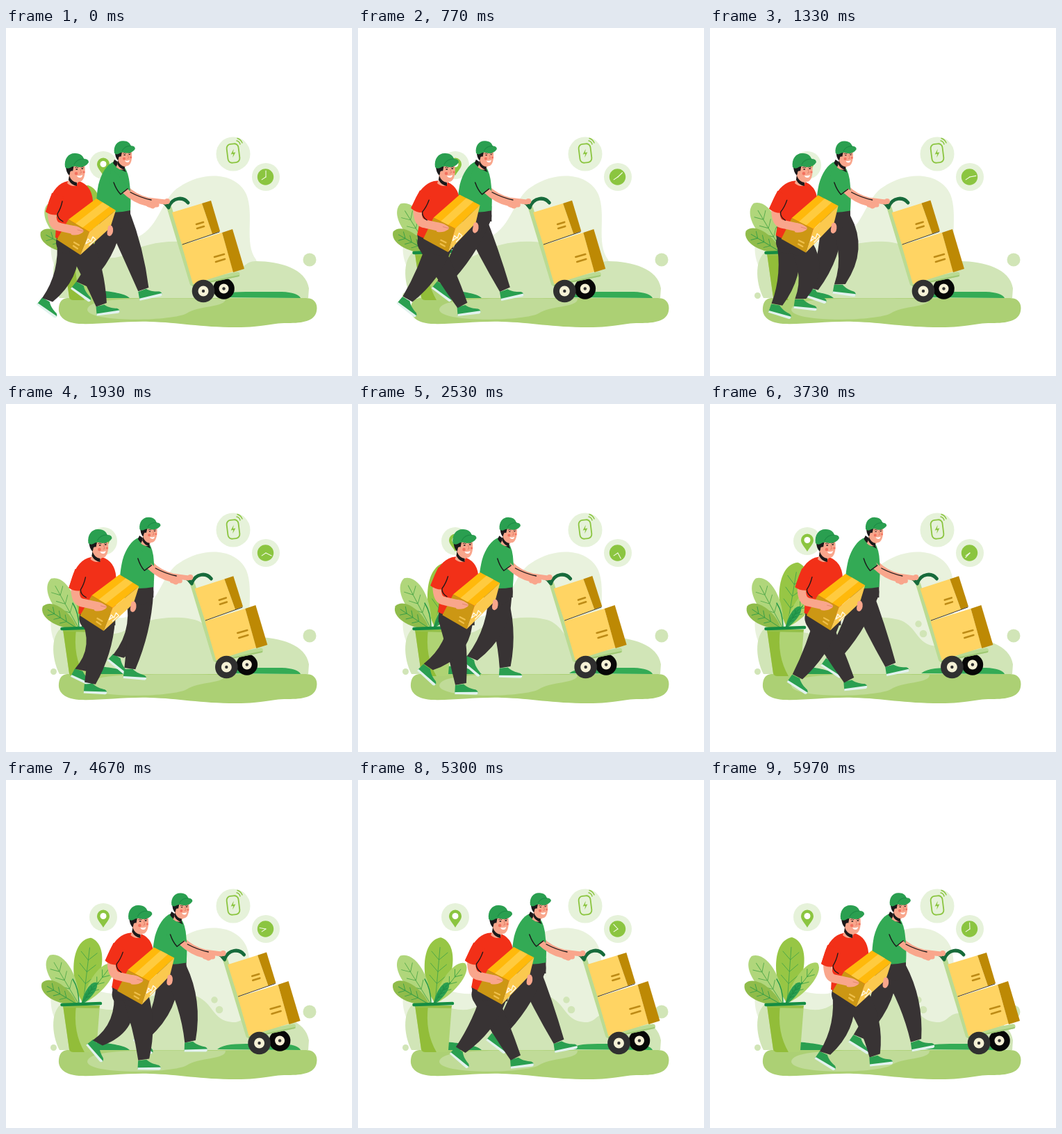
These frames come from a looping animation (498 px wide and 500 px high, 6010 ms). An HTML page with a canvas:

```html
<!DOCTYPE html>
<html lang="en">
<head>
<meta charset="utf-8">
<title>Delivery walk</title>
<style>
html, body { margin: 0; width: 100%; height: 100%; overflow: hidden; background: #fff; }
canvas { display: block; width: 498px; height: 500px; }
</style>
</head>
<body>
<canvas id="stage" width="498" height="500"></canvas>
<script>
const ctx = document.getElementById('stage').getContext('2d');
const LOOP = 6010, STEP = LOOP / 4, SPEED = 103 / 5970;
const TAU = Math.PI * 2, RAD = Math.PI / 180;
const C = {
  light: '#e9f2dd', hill: '#d1e5b7', ground: '#acd074', patch: '#c0db98',
  green: '#2a9f50', shirt: '#33aa55', deep: '#1d8a45', lime: '#8bc540', badge: '#e6f2da',
  skin: '#f9a68c', blush: '#f3715f', red: '#f23018', pants: '#383334', ink: '#1b191a'
};

function fill(d, color) { ctx.fillStyle = color; ctx.fill(new Path2D(d)); }
function line(d, color, w) {
  ctx.strokeStyle = color; ctx.lineWidth = w;
  ctx.lineCap = ctx.lineJoin = 'round';
  ctx.stroke(new Path2D(d));
}
function dot(x, y, r, color) {
  ctx.fillStyle = color;
  ctx.beginPath(); ctx.arc(x, y, r, 0, TAU); ctx.fill();
}
function at(x, y, deg, draw) {
  ctx.save(); ctx.translate(x, y); ctx.rotate(deg * RAD); draw(); ctx.restore();
}
// Rotate a drawing around a pivot in its own coordinates
function turn(px, py, deg, draw) {
  at(px, py, deg, () => { ctx.translate(-px, -py); draw(); });
}
const wave = (t, n) => (1 - Math.cos(TAU * n * t / LOOP)) / 2;

// Foot keys over one full stride: phase, x, y, tilt
const RED_STEP = [
  [0, 45, 405, -5], [.11, 24, 410, 3], [.285, -6, 410, 5], [.5, -40, 402, 38],
  [.61, -51, 389, 52], [.785, -24, 393, 28], [.9, 18, 399, 6]
];
const GREEN_STEP = [
  [0, 37, 382, -10], [.11, 22, 384, 2], [.285, -18, 389, 7], [.5, -60, 379, 38],
  [.61, -51, 379, 40], [.785, -41, 374, 42], [.9, 6, 378, 6]
];

// Periodic Hermite interpolation through the keys
function pose(keys, u) {
  u -= Math.floor(u);
  const n = keys.length;
  const key = i => {
    const k = keys[(i + n) % n], wrap = Math.floor(i / n);
    return [k[0] + wrap, k[1], k[2], k[3]];
  };
  let i = n - 1;
  while (keys[i][0] > u) i--;
  const a = key(i - 1), b = key(i), c = key(i + 1), d = key(i + 2);
  const h = c[0] - b[0], s = (u - b[0]) / h;
  return [1, 2, 3].map(j => {
    const m0 = (c[j] - a[j]) / (c[0] - a[0]) * h;
    const m1 = (d[j] - b[j]) / (d[0] - b[0]) * h;
    return (1 + 2 * s) * (1 - s) ** 2 * b[j] + s * (1 - s) ** 2 * m0
      + s * s * (3 - 2 * s) * c[j] + s * s * (s - 1) * m1;
  });
}

function leg(hx, hy, base, foot, bone, wide) {
  const [fx, fy, tilt] = foot, a = tilt * RAD;
  const x = base + fx;
  const ax = x - 8 * Math.cos(a) + 8 * Math.sin(a);
  const ay = fy - 8 * Math.sin(a) - 8 * Math.cos(a);
  at(x, fy, tilt, () => {
    fill('M-16 -6 L-4 -8 C2 -3 8 -2 14 -1 Q18 1 17 4 L-16 6 Z', C.green);
    fill('M-16 4 L17 2 Q18 5 15 6 L-16 7 Z', '#e2f2ee');
  });
  const dx = ax - hx, dy = ay - hy, dist = Math.hypot(dx, dy);
  const bend = Math.sqrt(Math.max(0, bone * bone - dist * dist / 4));
  const nx = dy / dist, ny = -dx / dist;
  const kx = hx + dx / 2 + nx * bend, ky = hy + dy / 2 + ny * bend;
  const w = [wide, wide * .9, 8];
  const p = [[hx, hy], [kx, ky], [ax, ay]];
  const side = (i, s) => [p[i][0] + nx * w[i] * s, p[i][1] + ny * w[i] * s];
  ctx.fillStyle = C.pants;
  ctx.beginPath();
  ctx.moveTo(...side(0, 1));
  ctx.quadraticCurveTo(...side(1, 1), ...side(2, 1));
  ctx.lineTo(...side(2, -1));
  ctx.quadraticCurveTo(...side(1, -1), ...side(0, -1));
  ctx.fill();
  dot(hx, hy, wide, C.pants);
}

function head() {
  fill('M93 199 L113 196 C115 208 113 221 105 221 Q102 222 102 226 Q95 229 88 223 Q92 215 90 208 Z', C.skin);
  fill('M91 212 Q94 221 102 222 L102 227 Q94 226 90 218 Z', C.ink);
  fill('M86 197 L98 196 L96 206 L93 206 L91 212 Q86 207 86 197 Z', C.ink);
  dot(95, 208, 2.8, C.skin);
  dot(101, 209, 2.3, C.blush);
  dot(112, 207, 1.6, C.blush);
  line('M101 203 l1.5 0 M109 202 l1.5 0', C.ink, 1.3);
  line('M99.5 200.5 q2 -1.5 4 0 M108 200 q2 -1.5 3.5 0', C.ink, .8);
  line('M107 203 l1.5 5 l-2 .5', '#d97561', .8);
  fill('M102 212 Q107 213 110 211 Q109.5 215.5 106 215 Q103 215 102 212 Z', '#fff');
  fill('M85 200 C83 187 91 179 100 180 C107 180 111 184 112 188 Q119 188 119 193 Q115 200 105 200 Q97 197 92 201 Q88 203 85 200 Z', C.green);
  line('M112 188 Q102 188 98 196', C.deep, 1.2);
}

function leaf(x, y, tx, ty, wide, color, vein) {
  const len = Math.hypot(tx - x, ty - y);
  at(x, y, Math.atan2(ty - y, tx - x) / RAD, () => {
    fill(`M0 0 C${len * .3} ${-wide * 1.15} ${len * .93} ${-wide * 1.4} ${len} 0 C${len * .93} ${wide * 1.4} ${len * .3} ${wide * 1.15} 0 0 Z`, color);
    let d = `M0 0 L${len * .85} 0`;
    for (const f of [.3, .48, .66]) {
      d += `M${len * f} 0 l${len * .12} ${-wide * .55} M${len * f} 0 l${len * .12} ${wide * .55}`;
    }
    line(d, vein, .9);
  });
}

function scenery() {
  fill('M74 350 C57 322 63 282 92 288 C130 305 165 315 190 300 C222 285 224 243 250 228 C286 204 332 208 346 239 C358 269 342 309 360 333 L380 388 L80 388 Z', C.light);
  fill('M77 388 C65 365 63 327 85 319 C110 312 142 342 172 325 C200 307 248 302 275 311 C299 321 297 346 326 348 C343 349 342 335 360 335 C394 335 432 346 436 374 L435 388 Z', C.hill);
  dot(437, 333, 9.5, C.hill);
  dot(68.5, 384.5, 4.5, C.hill);
  dot(300, 316, 4.7, C.hill);
  dot(307, 330, 5.3, C.hill);
  fill('M88 388 H432 C446 388 449 399 447 407 C444 421 428 424 405 424 C378 424 374 430 331 430 C279 430 249 423 207 422 C169 421 139 426 105 425 C81 423 75 412 76 402 Q77 389 88 388 Z', C.ground);
  fill('M117 405 C118 386 195 388 316 389 C316 402 278 398 260 410 C241 421 121 424 117 405 Z', C.patch);
  fill('M104 388 Q112 374 136 377 C151 379 171 381 178 388 Z', C.green);
  fill('M304 387 C314 379 330 379 354 379 H397 Q420 380 424 388 Z', '#34ab55');
}

function badges(t) {
  dot(327, 181, 24.5, C.badge);
  at(327, 180, -7, () => {
    ctx.strokeStyle = C.lime; ctx.lineWidth = 1.8;
    ctx.beginPath(); ctx.roundRect(-8.5, -13.5, 17, 27, 6); ctx.stroke();
    fill('M1.5 -6 L-3.5 1 L0 1 L-1.5 6 L3.5 -1 L0 -1 Z', C.lime);
  });
  line('M332 162 Q336 163 337 167 M333 158.5 Q338 160 340 165', C.lime, 1.4);

  dot(374, 214, 20, C.badge);
  dot(373.5, 214, 11.7, C.lime);
  at(374, 214, t / LOOP * 360, () => line('M0 0 V-9', '#f4fae9', 1.1));
  at(374, 214, 236, () => line('M0 0 V-7', '#f4fae9', 1.1));

  dot(140, 197, 20, C.badge);
  fill('M140 212 C136 205 131 201 131 195.5 A9 9 0 0 1 149 195.5 C149 201 144 205 140 212 Z', C.lime);
  dot(140, 195.5, 4.5, '#fff');
}

function plant(t) {
  const s = wave(t, 1);
  leaf(111, 321, 118 + 10 * s, 226 + 2 * s, 21, '#97c645', '#48a648');
  leaf(104, 321, 60 + 7 * s, 253 - 3 * s, 17, '#b0d67b', '#55aa4b');
  leaf(110, 321, 155 - 4 * s, 263 + 3 * s, 12, '#a9d264', '#48a648');
  leaf(102, 322, 50 + 4 * s, 293 - 3 * s, 13, '#90bc4b', '#399e46');
  leaf(109, 322, 130, 291, 6, C.green, C.deep);
  line('M105 321 Q105 300 96 286 M109 321 Q116 304 133 291', '#229748', 1.4);
  fill('M82 324 L135 324 L130 388 Q129 391 124 391 L97 391 Q92 391 91 387 Z', '#afd374');
  fill('M82 324 L101 324 Q96 362 113 391 L97 391 Q92 391 91 387 Z', '#92bd39');
  fill('M82 324 L135 324 L134 328 L83 327 Z', '#94bf48');
  line('M80.5 323 L136 321', '#158d43', 4.5);
}

function wheel(x, y, r, hub, color) {
  dot(x, y, r, color);
  dot(x, y, hub, '#f5f1d6');
  dot(x, y, 2.2, '#333');
}

function cart(t) {
  wheel(313.5, 374.5, 15.3, 7, '#070707');
  line('M235 258 L268 367 L333 354', '#badb93', 7);
  line('M269 370 L335 356', '#9fc874', 2);
  fill('M253 312 L311 294 L327 350 L269 368 Z', '#ffd463');
  fill('M311 294 L326 289 L343 346 L327 351 Z', '#bd8904');
  line('M300 329 L314 325 M302 336 L315 332', '#bd8b16', 2.6);
  at(253, 311, -1.3 * wave(t, 1), () => {
    fill('M-14 -46 L29 -59 L44 -15 L0 0 Z', '#ffd463');
    fill('M29 -59 L42 -63 L55 -19 L44 -15 Z', '#bd8904');
    line('M21 -29 L31 -32 M22 -23 L32 -26', '#bd8b16', 2.6);
    line('M1 0 L54 -18', '#2d2418', .9);
  });
  line('M234 257 C240 243 255 242 262 251', '#176b3b', 5);
  line('M217 250 Q223 247 229 252 L234 258', '#176b3b', 5);
  wheel(284, 378, 16.3, 7.5, '#303030');
}

function greenMan(t) {
  const x = 170 + SPEED * t, s = wave(t, 1), u = t / STEP;
  const handX = SPEED * t, reach = x + 4 * s;
  leg(x - 18, 270, x, pose(GREEN_STEP, u + .5), 56, 17);
  leg(x - 9, 270, x, pose(GREEN_STEP, u), 56, 18);
  at(handX, 0, 0, () => fill('M132 256 L179 256 L179 278 L134 278 Z', C.pants));
  // Far arm
  line(`M${reach + 1} 228 Q${reach + 14} 242 ${reach + 34} 247 L${handX + 229} 250`, C.skin, 7);
  dot(handX + 232, 249, 4, C.skin);
  const lean = draw => at(handX, 0, 0, () => turn(155, 263, 3 * s, draw));
  lean(() => {
    fill('M155 192 C145 196 137 209 133 225 C130 240 130 253 130 262 Q153 268 179 262 C180 245 179 231 177 217 Q174 201 166 195 Z', C.shirt);
    fill('M156 189 Q167 195 173 207 Q158 201 154 194 Z', C.ink);
    at(170 - 101 * .88, 171 - 190 * .88, 0, () => { ctx.scale(.88, .88); head(); });
  });
  // Near arm
  line(`M${reach - 1} 232 Q${reach + 16} 248 ${reach + 32} 251 L${handX + 211} 255`, C.skin, 9);
  line(`M${reach + 9} 236 Q${reach + 24} 244 ${reach + 39} 247`, C.ink, 1.3);
  line(`M${handX + 206} 254 L${handX + 217} 254`, C.skin, 7);
  lean(() => {
    fill('M151 204 C160 206 168 220 175 230 L164 240 Q153 232 148 220 Z', C.shirt);
    line('M155 222 Q159 233 165 239 L175 231', C.ink, 1.4);
  });
}

function parcel() {
  fill('M90 275 L130 245 L158 262 L120 293 Z', '#ffb90b');
  fill('M100 281 L139 250.5 L149 256.5 L110 287 Z', '#ffcb3f');
  fill('M90 275 L120 293 L107 326 L73 304 Z', '#cc9714');
  fill('M120 293 L158 262 L150 287 L107 326 Z', '#fbc94f');
  line('M98 308 L105 312 M97 313 L103 317', '#f0c04c', 2.2);
  line('M115 310 L118 303 L121 306 L115 310 M122 307 L125 300 L128 303 M120 312 L129 304', '#fff8e6', 1.4);
}

function redMan(t) {
  const x = 101 + SPEED * t, s = wave(t, 3), u = t / STEP;
  leg(x - 12, 308, x, pose(RED_STEP, u + .5), 48, 17);
  leg(x + 4, 308, x, pose(RED_STEP, u), 48, 19);
  ctx.save();
  ctx.translate(x - 101, 0);
  const lean = draw => turn(98, 305, 9 * s, draw);
  fill('M72 297 L124 290 L124 318 L75 316 Z', C.pants);
  lean(() => fill('M89 220 C76 222 67 234 62 248 L57 264 Q64 269 73 268 L71 301 Q82 306 96 306 L125 300 L125 248 Q123 226 105 220 Z', C.red));
  at(14.5 * s, 0, 0, head);
  ctx.translate(7 * s, -5 * s);
  turn(115, 285, -5 * s, parcel);
  line('M66 268 C67 279 69 285 78 286 L96 290', C.skin, 12);
  fill('M91 284 Q100 283 108 288 Q114 291 110 294 Q103 299 94 297 Z', C.skin);
  line('M103 290 L111 292', '#dc8069', .8);
  fill('M147 285 Q152 281 154 288 Q155 297 149 299 Q144 298 146 291 Z', C.skin);
  ctx.translate(-7 * s, 5 * s);
  lean(() => {
    fill('M66 237 L57 264 Q65 270 76 268 L83 243 Z', C.red);
    line('M81 249 Q79 259 74 267 Q74 274 82 278', C.ink, 1.3);
  });
  ctx.restore();
}

function draw(t) {
  ctx.fillStyle = '#fff';
  ctx.fillRect(0, 0, 498, 500);
  scenery();
  badges(t);
  plant(t);
  at(SPEED * t, 0, 0, () => cart(t));
  greenMan(t);
  redMan(t);
}

const start = performance.now();
function tick() {
  draw((performance.now() - start) % LOOP);
  requestAnimationFrame(tick);
}
tick();
</script>
</body>
</html>
```
